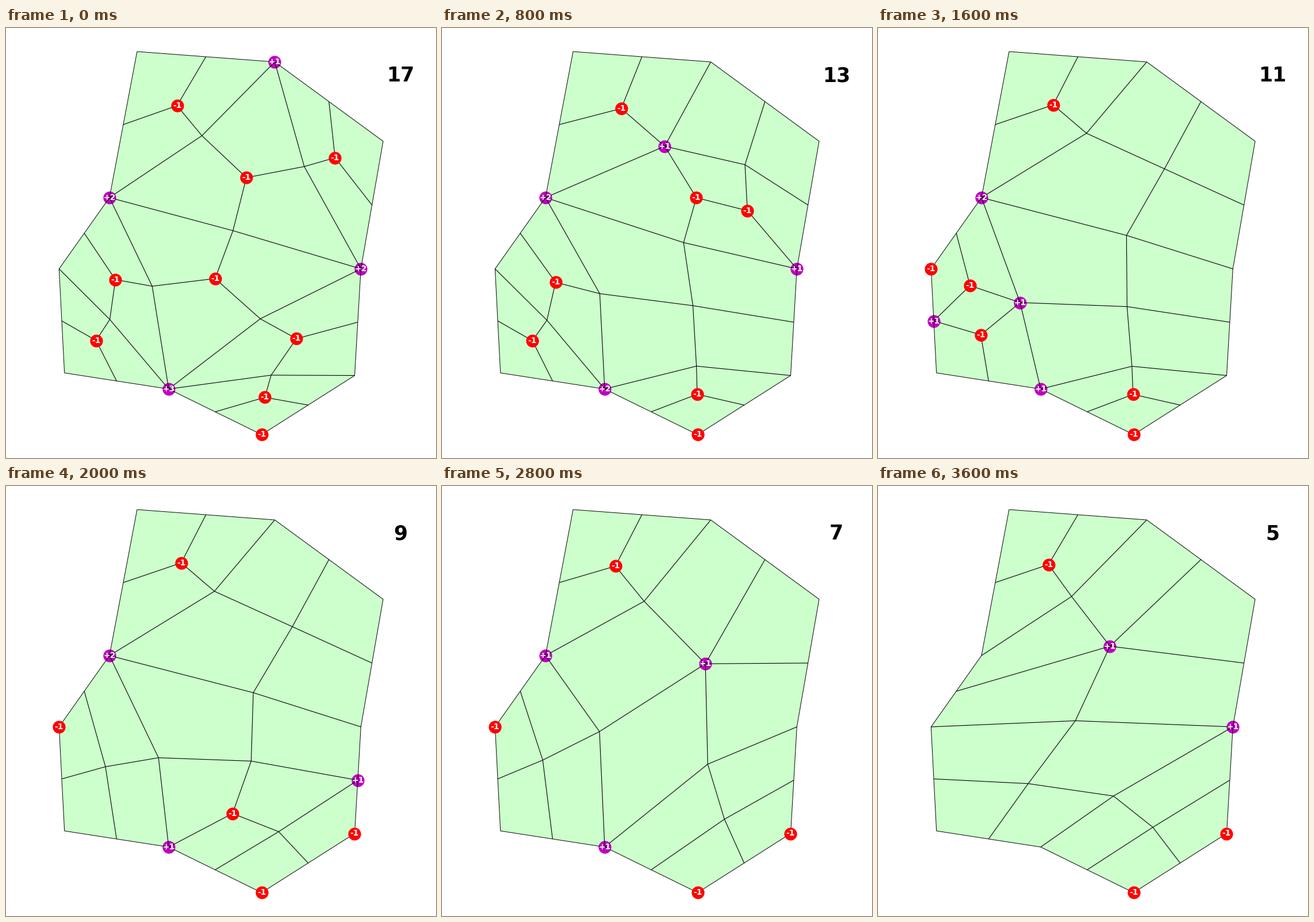
These frames come from a looping animation (748x748 px, 4600 ms). A matplotlib script:

```python
import numpy as np
import matplotlib.pyplot as plt
from matplotlib.animation import FuncAnimation
from matplotlib.collections import LineCollection
from matplotlib.patches import Polygon

SIZE, DPI = 748, 100
STEP_MS, SLOTS = 200, 23
SETTLE, SWEEPS = 500, 5  # smoothing passes at the start and after each step

CORNERS = np.array([(228, 41), (467.5, 59), (656, 197), (617.3, 419), (606.5, 604.5),
                    (444.7, 707.3), (283, 628), (101.7, 600), (92.3, 419), (180, 295)])
RIGHT_ANGLES = {"0", "4", "14"}  # border vertices that need no inner edge

# Inner vertices are letters, border vertices are numbers.
START = ("a1 a19 ab b2 b18 bc cd cf d2 de d6 e3 e5 f18 f6 fg gh gl h18 hi h12 "
         "i17 ij j16 jk j12 k15 k13 l6 l12 lm m7 mn n12 n8 no o11 o9")

STEPS = [
    "flip l6 fm", "merge l n", "merge m g", "flip d2 be", "merge d 5", "merge c e",
    "flip j12 hk", "merge j 15", "merge i k", "flip n8 o7", "merge n 11", "merge o g",
    "flip f18 eh", "flip hg f12", "flip ef h6", "flip h12 kf", "flip h18 e17", "flip k17 h16",
]


def border_points():
    mids = (CORNERS + np.roll(CORNERS, -1, axis=0)) / 2
    pts = np.stack([CORNERS, mids], axis=1).reshape(-1, 2)
    return {str(i): p for i, p in enumerate(pts)}


BORDER = border_points()


def edge(text):
    return frozenset((text[0], text[1:]))


def apply_step(edges, pos, step):
    kind, first, second = step.split()
    if kind == "flip":
        return (edges - {edge(first)}) | {edge(second)}, pos
    moved = {frozenset(second if v == first else v for v in e) for e in edges}
    edges = {e for e in moved if len(e) == 2 and not e <= BORDER.keys()}
    if second not in BORDER:
        pos = {**pos, second: (pos[first] + pos[second]) / 2}
    return edges, {v: p for v, p in pos.items() if v != first}


def neighbours(edges):
    near = {}
    for u, v in map(tuple, edges):
        near.setdefault(u, []).append(v)
        near.setdefault(v, []).append(u)
    return near


def smooth(pos, near, sweeps):
    """Move all inner vertices at once to the mean of their neighbours."""
    for _ in range(sweeps):
        pos = {v: p if v in BORDER else np.mean([pos[w] for w in near[v]], axis=0)
               for v, p in pos.items()}
    return pos


def charge(v, near):
    degree = len(near.get(v, []))
    if v not in BORDER:
        return degree - 4
    return degree - (v not in RIGHT_ANGLES)


def build_states():
    edges = {edge(t) for t in START.split()}
    near = neighbours(edges)
    centre = CORNERS.mean(axis=0)
    pos = smooth({**{v: centre for v in near}, **BORDER}, near, SETTLE)
    states = []
    for step in [None, *STEPS]:
        if step:
            edges, pos = apply_step(edges, pos, step)
            near = neighbours(edges)
            pos = smooth(pos, near, SWEEPS)
        lines = [[pos[v] for v in sorted(e)] for e in edges]
        marks = [(pos[v], charge(v, near)) for v in pos if charge(v, near)]
        states.append((lines, marks))
    return states


STATES = build_states()

fig = plt.figure(figsize=(SIZE / DPI, SIZE / DPI), dpi=DPI, facecolor="white")
ax = fig.add_axes([0, 0, 1, 1])
ax.set_xlim(0, SIZE)
ax.set_ylim(SIZE, 0)
ax.axis("off")

ax.add_patch(Polygon(list(BORDER.values()), facecolor="#ccffcc", edgecolor="none", zorder=0))
ax.add_patch(Polygon(list(BORDER.values()), fill=False, edgecolor="black", lw=0.7, zorder=2))
wires = ax.add_collection(LineCollection([], colors="black", linewidths=0.8, zorder=2))
plus, = ax.plot([], [], "o", color=(0.75, 0, 0.75), ms=15, zorder=1)
minus, = ax.plot([], [], "o", color="red", ms=15, zorder=3)
total = ax.text(686, 93, "", fontsize=25, weight="bold", family="DejaVu Sans",
                ha="center", va="baseline")
labels = [ax.text(0, 0, "", fontsize=10, weight="bold", family="DejaVu Sans", color="white",
                  ha="center", va="center", zorder=4)
          for _ in range(max(len(marks) for _, marks in STATES))]


def place(dots, points):
    dots.set_data([p[0] for p in points], [p[1] for p in points])


def draw(i):
    lines, marks = STATES[min(i, len(STATES) - 1)]
    wires.set_segments(lines)
    place(plus, [p for p, c in marks if c > 0])
    place(minus, [p for p, c in marks if c < 0])
    for k, label in enumerate(labels):
        label.set_visible(k < len(marks))
        if k < len(marks):
            label.set_position(marks[k][0])
            label.set_text(f"{marks[k][1]:+d}")
    total.set_text(str(sum(abs(c) for _, c in marks)))
    return [wires, plus, minus, total, *labels]


anim = FuncAnimation(fig, draw, frames=SLOTS, interval=STEP_MS, repeat=True,
                     repeat_delay=0, blit=False)
plt.show()
```
